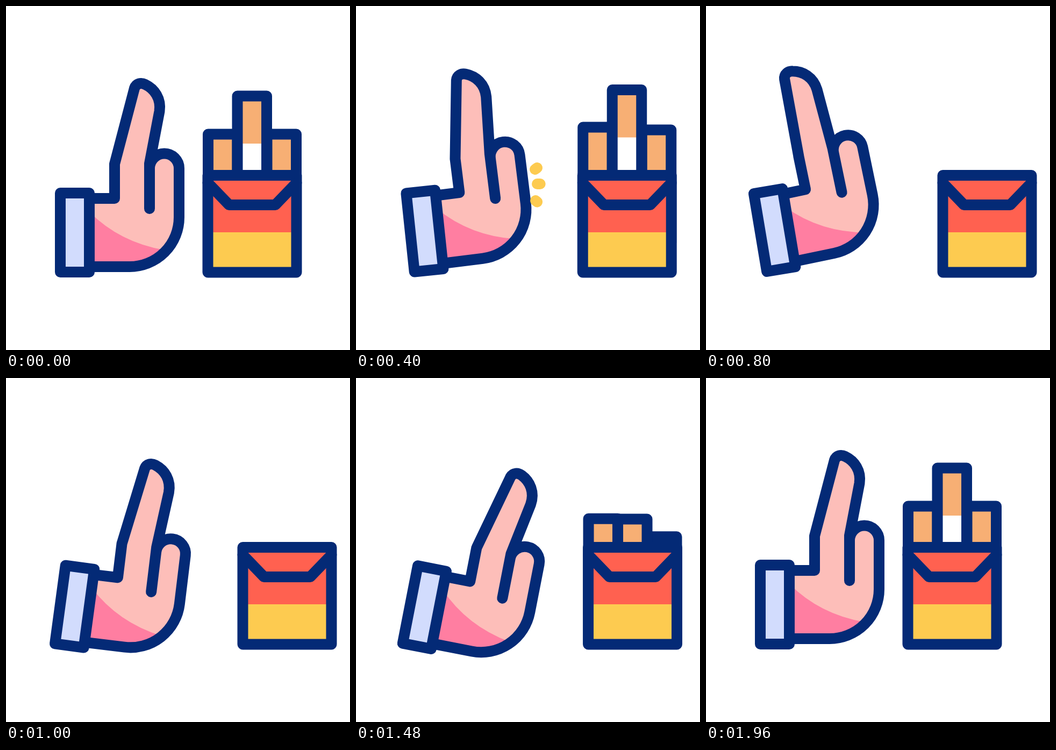
Write an HTML page with a canvas that moves like this. It is 640 px wide and 640 px high and loops after 2000 ms.

```html
<!DOCTYPE html>
<html lang="en">
<head>
<meta charset="utf-8">
<title>Refusing cigarettes</title>
<style>
  html, body { margin: 0; width: 100%; height: 100%; overflow: hidden; background: #fff; }
  canvas { display: block; }
</style>
</head>
<body>
<canvas id="stage" width="640" height="640"></canvas>
<script>
const ctx = document.getElementById('stage').getContext('2d');
const LOOP = 2000, STEP = 40;
const NAVY = '#042a76', SKIN = '#fdbeb9', PINK = '#ff7ea1', CUFF = '#d2dcfd';
const RED = '#ff6150', YELLOW = '#fdcb50', TAN = '#f7af74';

// Eased keyframe tracks: [time, value] pairs
const cuffKeys = [[200, 0], [280, 4.5], [480, -11.7], [800, -9.5], [1133, 17], [1330, -1.2], [1490, 11.2], [1740, 0]];
const bendKeys = [[280, 0], [520, 1], [800, 1], [1133, 0], [1330, 0.9], [1490, 0]];
const packKeys = [[200, 0], [510, 65], [1340, 65], [1960, 0]];

function ease(t, from, to) {
  const p = Math.min(1, Math.max(0, (t - from) / (to - from)));
  return p * p * (3 - 2 * p);
}

function track(t, keys) {
  let value = keys[0][1];
  for (let i = 1; i < keys.length; i++) {
    value += (keys[i][1] - keys[i - 1][1]) * ease(t, keys[i - 1][0], keys[i][0]);
  }
  return value;
}

function rotateAt(x, y, degrees) {
  ctx.translate(x, y);
  ctx.rotate(degrees * Math.PI / 180);
  ctx.translate(-x, -y);
}

function line(points, color = NAVY) {
  ctx.beginPath();
  points.forEach(([x, y]) => ctx.lineTo(x, y));
  ctx.strokeStyle = color;
  ctx.stroke();
}

function fillRect(x, y, w, h, color) {
  ctx.fillStyle = color;
  ctx.fillRect(x, y, w, h);
}

function outlineRect(x, y, w, h) {
  ctx.strokeStyle = NAVY;
  ctx.strokeRect(x, y, w, h);
}

// The hand tilts at the wrist, the fingers bend further at their base
function traceHand(bend) {
  ctx.save();
  rotateAt(155, 485, -2.2 * bend);
  ctx.beginPath();
  ctx.moveTo(155, 358);
  ctx.lineTo(202, 358);
  ctx.lineTo(202, 294);
  ctx.save();
  rotateAt(206, 294, -13.4 * bend);
  ctx.lineTo(202, 294);
  ctx.lineTo(239, 153);
  ctx.bezierCurveTo(242, 144, 251, 142, 259, 146);
  ctx.bezierCurveTo(276, 154, 289, 172, 285.5, 196);
  ctx.restore();
  ctx.lineTo(267, 293);
  ctx.lineTo(267, 377);
  ctx.lineTo(267, 302);
  ctx.arc(294.5, 302, 27.5, Math.PI, 0);
  ctx.lineTo(322, 393);
  ctx.arc(230, 393, 92, 0, Math.PI / 2);
  ctx.lineTo(155, 485);
  ctx.restore();
}

function drawHand(t) {
  const bend = track(t, bendKeys);
  ctx.save();
  rotateAt(101, 421, track(t, cuffKeys));

  // Skin, with a palm shadow that keeps the tilt of the cuff
  ctx.save();
  traceHand(bend);
  ctx.fillStyle = SKIN;
  ctx.fill();
  ctx.clip();
  ctx.beginPath();
  ctx.moveTo(155, 383);
  ctx.quadraticCurveTo(212, 440, 295, 454);
  ctx.lineTo(340, 460);
  ctx.lineTo(340, 520);
  ctx.lineTo(155, 520);
  ctx.fillStyle = PINK;
  ctx.fill();
  ctx.restore();

  traceHand(bend);
  ctx.strokeStyle = NAVY;
  ctx.stroke();

  fillRect(101, 348, 54, 147, CUFF);
  outlineRect(101, 348, 54, 147);
  ctx.restore();
}

function drawCigarette(t, x, top, index, depth, tip) {
  const out = 42 * index, back = 1285 + out;
  const dy = track(t, [
    [200 + out, 0], [400 + out, -13], [700 + out, depth],
    [back, depth], [back + 340, -13], [back + 590, 0]
  ]);
  const y = top + dy;
  fillRect(x, y, 54.5, 440 - y, TAN);
  if (tip) fillRect(x, y + 88.5, 54.5, Math.max(0, 440 - y - 88.5), '#fff');
  outlineRect(x, y, 54.5, 440 - y);
}

function drawPack(t) {
  ctx.save();
  ctx.translate(375.5 + track(t, packKeys), 0);
  drawCigarette(t, 0.5, 238.5, 0, 80, false);
  drawCigarette(t, 110, 238.5, 2, 80, false);
  drawCigarette(t, 55, 167.5, 1, 175, true);
  fillRect(0, 315, 165, 106, RED);
  fillRect(0, 421, 165, 74, YELLOW);
  outlineRect(0, 315, 165, 180.5);
  line([[0, 329], [39.5, 370], [125.5, 370], [165, 329]]);
  ctx.restore();
}

function drawRays(t) {
  const start = ease(t, 525, 800), end = ease(t, 360, 600);
  if (end <= start) return;
  for (const [x, y, dx, dy] of [[333, 304, 54, -39], [337, 331, 77, 0], [334, 362, 42, 34]]) {
    line([start, end].map(p => [x + dx * p, y + dy * p]), YELLOW);
  }
}

function draw(t) {
  fillRect(0, 0, 640, 640, '#fff');
  ctx.lineWidth = 20;
  ctx.lineCap = ctx.lineJoin = 'round';
  drawPack(t);
  drawHand(t);
  drawRays(t);
}

const begin = performance.now();
function frame() {
  const t = (performance.now() - begin) % LOOP;
  draw(Math.floor(t / STEP) * STEP);
  requestAnimationFrame(frame);
}
frame();
</script>
</body>
</html>
```
